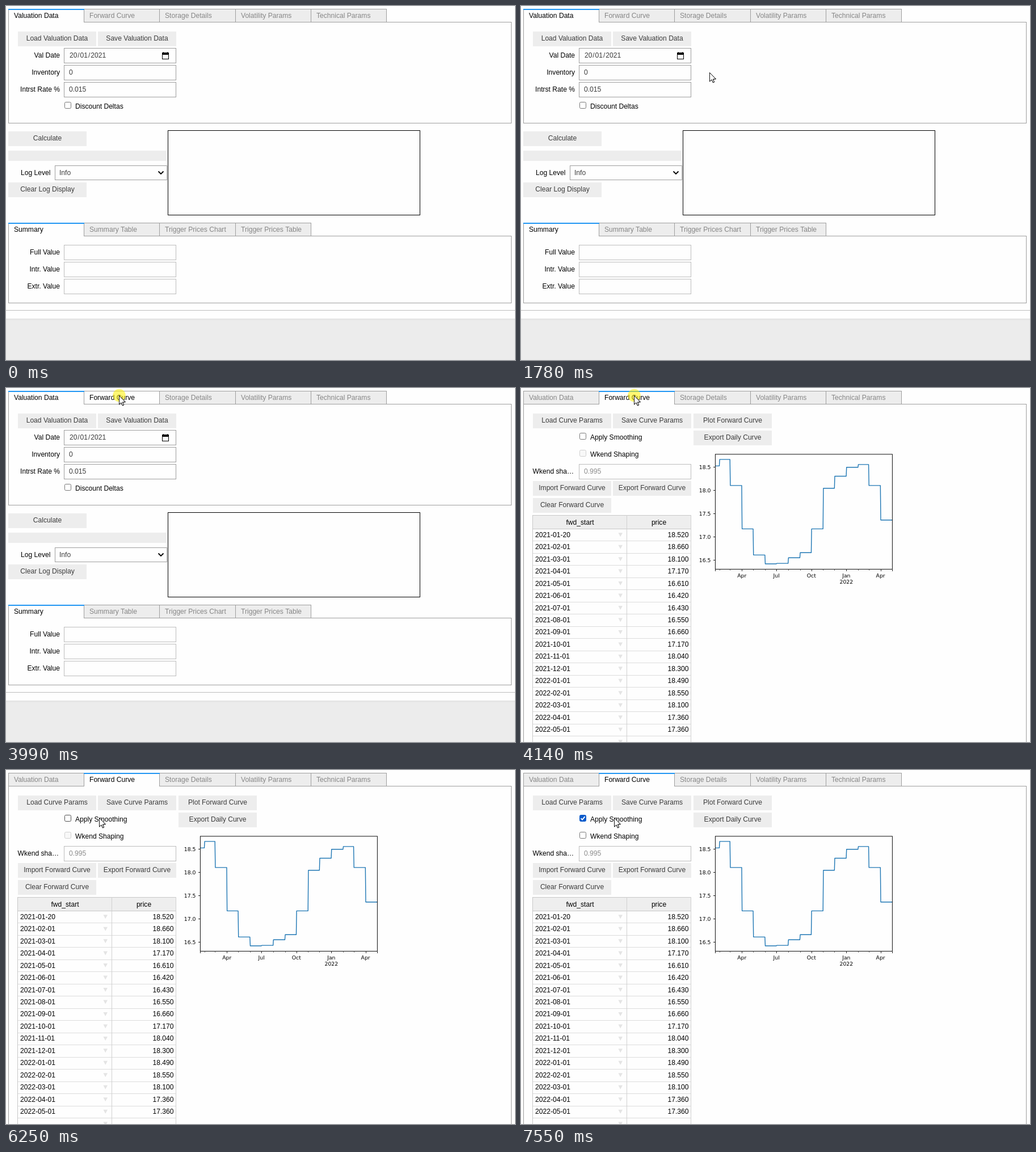
Recreate the animation shown at these times as an HTML page with a canvas. Size 897 by 624 pixels, loop 8 s.

```html
<!DOCTYPE html>
<html lang="en">
<head>
<meta charset="utf-8">
<title>Storage valuation form</title>
<style>
html, body { margin: 0; width: 100%; height: 100%; overflow: hidden; background: #fefefe; }
canvas { display: block; }
</style>
</head>
<body>
<canvas id="stage" width="897" height="624"></canvas>
<script>
const ctx = document.getElementById('stage').getContext('2d');
const LOOP = 8000;
const SANS = '12.1px "Liberation Sans", Arial, sans-serif';
const PLOT = '9.3px "DejaVu Sans", sans-serif';
const PAGE = '#fefefe', GREY = '#ededed', EDGE = '#9e9e9e', SOFT = '#bdbdbd';
const INK = '#000', BODY = '#3c3c3c', MUTED = '#868686';

const TOP_TABS = ['Valuation Data', 'Forward Curve', 'Storage Details', 'Volatility Params', 'Technical Params'];
const LOW_TABS = ['Summary', 'Summary Table', 'Trigger Prices Chart', 'Trigger Prices Table'];
const PRICES = [18.52, 18.66, 18.1, 17.17, 16.61, 16.42, 16.43, 16.55, 16.66,
  17.17, 18.04, 18.3, 18.49, 18.55, 18.1, 17.36, 17.36];

// Cursor legs: start, end, samples, from, to, vertical ease power
const LEGS = [
  [380, 530, 3, [821, 571], [621, 380], 1],
  [1160, 1160, 1, [621, 380], [630, 385], 1],
  [1320, 2110, 11, [630, 385], [161, 27], 1.37],
  [2190, 2430, 4, [161, 27], [199, 13], 1],
  [5530, 5530, 1, [199, 13], [200, 13], 1],
  [5710, 6250, 8, [200, 13], [164, 84], 1]
];

function cursorAt(t) {
  const leg = LEGS.filter(l => t >= l[0]).pop();
  if (!leg) return null;
  const [t0, t1, n, a, b, pow] = leg;
  const step = t1 > t0 ? Math.min(n - 1, Math.floor((t - t0) / (t1 - t0) * (n - 1) + 0.2)) : 0;
  // The entry leg shows its first sample at the starting point
  const s = leg === LEGS[0] ? step / (n - 1) : (step + 1) / n;
  const e = 1 - Math.pow(1 - s, pow);
  return [Math.round(a[0] + (b[0] - a[0]) * s), Math.round(a[1] + (b[1] - a[1]) * e)];
}

function fill(x, y, w, h, color) {
  ctx.fillStyle = color;
  ctx.fillRect(x, y, w, h);
}

function frame(x, y, w, h, color) {
  ctx.strokeStyle = color;
  ctx.lineWidth = 1;
  ctx.strokeRect(x + 0.5, y + 0.5, w - 1, h - 1);
}

function path(points, color, width, close) {
  ctx.beginPath();
  points.forEach(p => ctx.lineTo(p[0], p[1]));
  if (close) ctx.closePath();
  ctx.strokeStyle = color;
  ctx.lineWidth = width;
  ctx.stroke();
}

// y is the middle of the capitals; baselines sit on whole pixels
function text(str, x, y, color = INK, align = 'left', font = SANS) {
  ctx.font = font;
  ctx.textAlign = align;
  ctx.fillStyle = color;
  ctx.fillText(str, x, Math.round(y + (font === PLOT ? 3.3 : 4)));
}

function button(label, x, y, mouse) {
  const over = mouse && mouse[0] >= x && mouse[0] < x + 138 && mouse[1] >= y && mouse[1] < y + 26;
  ctx.save();
  if (over) {
    ctx.shadowColor = 'rgba(0,0,0,.3)';
    ctx.shadowBlur = 4;
    ctx.shadowOffsetY = 2;
  }
  fill(x, y, 138, 26, GREY);
  ctx.restore();
  text(label, x + 69, y + 12, BODY, 'center');
}

function input(y, value, border = EDGE, color = BODY) {
  frame(102, y, 198, 27, border);
  text(value, 111, y + 13, color);
}

function checkbox(y, state) {
  const border = { idle: '#767676', hover: '#4f4f4f', active: '#8d8d8d', off: '#cfcfcf', on: '#0b5bcb' }[state];
  ctx.beginPath();
  ctx.roundRect(103.5, y + 0.5, 11, 11, 2);
  ctx.fillStyle = state === 'on' ? border : state === 'off' ? '#f8f8f8' : '#fff';
  ctx.fill();
  ctx.strokeStyle = border;
  ctx.lineWidth = 1;
  ctx.stroke();
  if (state === 'on') path([[105.5, y + 6.2], [108, y + 8.7], [112.6, y + 3.2]], '#fff', 1.8);
}

function tabs(labels, y, active, hover, bottom) {
  const edge = i => Math.floor(4 + i * 133.35);
  frame(4, y + 23, 887, bottom - y - 23, EDGE);
  labels.forEach((label, i) => {
    const x = edge(i), w = edge(i + 1) - x + 1;
    const lit = i === active || i === hover;
    fill(x, y, w, 24, lit ? PAGE : GREY);
    frame(x, y, w, 24, EDGE);
    if (i === active) fill(x + 1, y + 23, w - 2, 1, PAGE);
    text(label, x + 10, y + 11.5, lit ? INK : MUTED);
  });
  fill(edge(active), y, 134, 2, '#2196f3');
}

function calendar(x, y) {
  frame(x, y + 1, 12, 12, INK);
  fill(x, y + 1, 12, 4, INK);
  fill(x + 2, y, 1, 2, INK);
  fill(x + 9, y, 1, 2, INK);
}

function valuation(hover) {
  tabs(TOP_TABS, 5, 0, hover, 207);
  button('Load Valuation Data', 21, 45);
  button('Save Valuation Data', 162, 45);
  ['Val Date', 'Inventory', 'Intrst Rate %'].forEach((s, i) => text(s, 95, 87 + i * 30, INK, 'right'));
  input(74, '');
  [['20', 112], ['/', 126.3], ['01', 130.6], ['/', 145], ['2021', 149.3]]
    .forEach(([s, x]) => text(s, x, 87, BODY));
  calendar(275, 81);
  input(104, '0');
  input(134, '0.015');
  checkbox(169, 'idle');
  text('Discount Deltas', 122, 177);

  button('Calculate', 4, 221);
  fill(4, 255, 280, 18, GREY);
  text('Log Level', 78.5, 294, INK, 'right');
  frame(86, 281, 198, 26, EDGE);
  text('Info', 94, 294, BODY);
  path([[268.5, 291.5], [273, 296], [277.5, 291.5]], INK, 1.8);
  button('Clear Log Display', 4, 311);
  frame(285, 219, 445, 150, INK);

  tabs(LOW_TABS, 382, 0, -1, 524);
  ['Full Value', 'Intr. Value', 'Extr. Value'].forEach((s, i) => {
    text(s, 95, 434 + i * 30, INK, 'right');
    input(421 + i * 30, '', SOFT);
  });

  fill(0, 536, 897, 1, SOFT);
  const shade = ctx.createLinearGradient(0, 550, 0, 555);
  shade.addColorStop(0, '#dedede');
  shade.addColorStop(1, '#ececec');
  fill(0, 551, 897, 73, shade);
}

function table() {
  const rowH = 21.47, top = 248;
  fill(21, 224, 279, 24, '#eee');
  text('fwd_start', 104, 237, INK, 'center');
  text('price', 243, 237, INK, 'center');
  for (let i = 0; i <= PRICES.length; i++) {
    const y = top + i * rowH, mid = y + 10.7;
    fill(21, Math.round(y), 279, 1, i ? '#dcdcdc' : '#c8c8c8');
    ctx.beginPath();
    [[171.5, mid - 3.5], [179, mid - 3.5], [175.2, mid + 3.5]].forEach(p => ctx.lineTo(p[0], p[1]));
    ctx.fillStyle = '#e4e4e4';
    ctx.fill();
    if (i === PRICES.length) continue;
    const day = new Date(Date.UTC(2021, i, i ? 1 : 20)).toISOString().slice(0, 10);
    text(day, 25, mid);
    text(PRICES[i].toFixed(3), 295.5, mid, INK, 'right');
  }
  fill(20, 224, 280, 1, '#c8c8c8');
  fill(20, 224, 1, 400, '#c8c8c8');
  fill(186, 224, 1, 400, '#d0d0d0');
  fill(299, 224, 1, 400, '#d0d0d0');
}

function chart() {
  const day0 = Date.UTC(2021, 0, 20);
  const xDay = d => 342.1 + 0.6695 * d;
  const xMonth = m => (Date.UTC(2021, m, 1) - day0) / 864e5;
  const yAt = v => 139 + (18.5 - v) * 82.2;

  const points = [[xDay(0), yAt(PRICES[0])]];
  for (let i = 1; i < PRICES.length; i++) {
    const d = xMonth(i);
    points.push([xDay(d - 1), yAt(PRICES[i - 1])], [xDay(d), yAt(PRICES[i])]);
  }
  ctx.lineJoin = 'round';
  path(points, '#1f77b4', 1.4);
  ctx.lineJoin = 'miter';

  ctx.strokeStyle = '#000';
  ctx.lineWidth = 0.95;
  ctx.strokeRect(342.4, 116.8, 312, 202.6);

  for (let v = 16.5; v < 19; v += 0.5) {
    fill(339, Math.round(yAt(v)), 3, 1, '#222');
    text(v.toFixed(1), 334.5, yAt(v) + 0.7, INK, 'right', PLOT);
  }
  fill(342, 320, 1, 3, '#222');
  fill(654, 320, 1, 3, '#222');
  const names = { 3: 'Apr', 6: 'Jul', 9: 'Oct', 12: 'Jan', 15: 'Apr' };
  for (let m = 1; m < 16; m++) {
    const x = xDay(xMonth(m));
    fill(Math.floor(x), 320, 1, names[m] ? 3 : 2, names[m] ? '#222' : '#777');
    if (names[m]) text(names[m], x - 0.4, 330.5, INK, 'center', PLOT);
  }
  text('2022', xDay(xMonth(12)) - 0.4, 342, INK, 'center', PLOT);
}

function curve(t, mouse) {
  const checked = t >= 7550;
  tabs(TOP_TABS, 5, 1, -1, 640);
  button('Load Curve Params', 21, 45, mouse);
  button('Save Curve Params', 162, 45, mouse);
  button('Plot Forward Curve', 304, 45, mouse);
  button('Export Daily Curve', 304, 75, mouse);
  checkbox(79, checked ? 'on' : t >= 7410 ? 'active' : mouse[1] > 74 ? 'hover' : 'idle');
  text('Apply Smoothing', 122, 87);
  checkbox(109, checked ? 'idle' : 'off');
  text('Wkend Shaping', 122, 117);
  text('Wkend sha…', 20.5, 147);
  input(134, '0.995', SOFT, '#8c8c8c');
  button('Import Forward Curve', 21, 164);
  button('Export Forward Curve', 162, 164);
  button('Clear Forward Curve', 21, 194);
  table();
  chart();
}

function tooltip() {
  fill(173, 97, 102, 23, '#fff');
  frame(173, 97, 102, 23, '#8a8a8a');
  text('Apply Smoothing', 224, 108.5, '#575757', 'center', '11px "Open Sans", sans-serif');
}

function clickSpot(x, y) {
  ctx.beginPath();
  ctx.arc(x, y, 11.2, 0, Math.PI * 2);
  ctx.fillStyle = 'rgba(255,240,0,.55)';
  ctx.fill();
}

function pointer([x, y]) {
  const shape = [[0, 0], [0, 15.5], [3.5, 12.3], [6, 17.5], [8.2, 16.5], [5.8, 11.5], [10.8, 11.2]]
    .map(p => [x + 0.5 + p[0], y + 0.5 + p[1]]);
  ctx.fillStyle = '#fff';
  path(shape, '#111', 1, true);
  ctx.fill();
  path(shape, '#111', 1, true);
}

function draw(t) {
  const mouse = cursorAt(t);
  fill(0, 0, 897, 624, PAGE);
  if (t < 4140) valuation(t >= 2190 ? 1 : -1);
  else curve(t, mouse);
  if (t >= 6780 && t < 7410) tooltip();
  if (t >= 3990 && t < 4450) clickSpot(199.5, 13);
  if (t >= 7410 && t < 7550) clickSpot(163.8, 83.5);
  if (mouse) pointer(mouse);
}

const start = performance.now();
function tick() {
  draw((performance.now() - start) % LOOP);
  requestAnimationFrame(tick);
}
tick();
</script>
</body>
</html>
```
